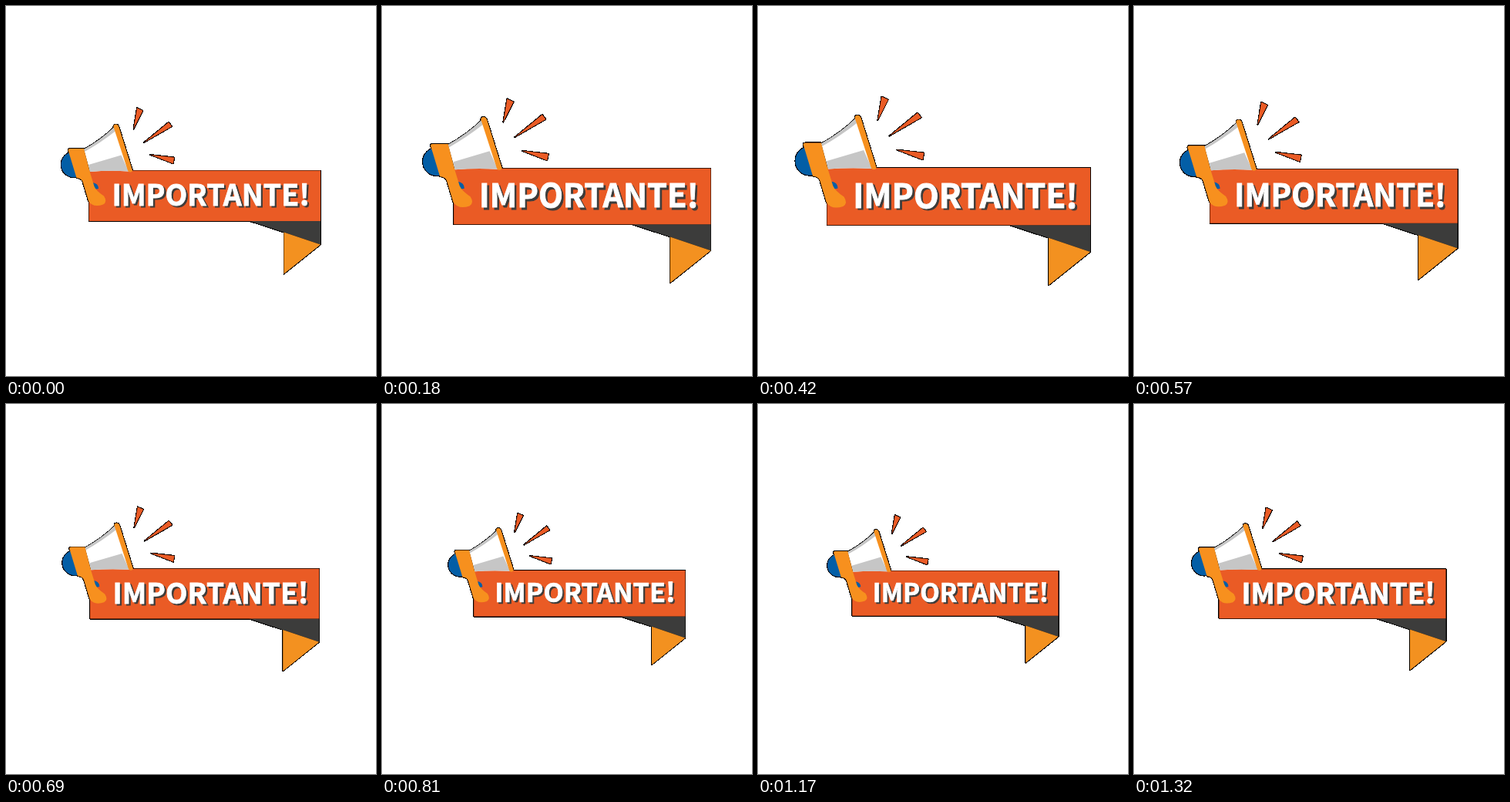
Write an HTML page that moves like this. It is 480 px wide and 480 px high and loops after 1.35 s.

```html
<!DOCTYPE html>
<html lang="es">
<head>
<meta charset="utf-8">
<style>
  html, body { margin: 0; width: 100%; height: 100%; overflow: hidden; background: #fff; }
  svg { display: block; width: 100%; height: 100%; }
  path, circle { vector-effect: non-scaling-stroke; stroke-linejoin: round; }
  text { font: 700 37.4px "Noto Sans CJK JP", "Noto Sans CJK SC", "Noto Sans CJK", "Open Sans", sans-serif; text-anchor: middle; stroke-width: .8px; }
</style>
</head>
<body>
<svg viewBox="0 0 480 480">
  <defs>
    <g id="art">
      <!-- banner and folded tail -->
      <path fill="#3c3c3b" d="M316 279H408V309.5L360.5 293.5Z"/>
      <path fill="#f39120" d="M360.5 293.5L408 309.5L360.5 347.5Z"/>
      <path fill="#ea5b25" d="M107.7 213.6H408V279H107.7Z"/>
      <!-- megaphone -->
      <circle fill="#035ea6" cx="88" cy="205.7" r="16.5"/>
      <path fill="#035ea6" d="M112 229Q120 230 120 237L115 238Z"/>
      <path fill="#fff" d="M101 186Q123 174 141 156.5L159 214.5Q134 213 109 215Z"/>
      <path fill="#c6c6c6" d="M101 186Q123 174 141 156.5L143 161.5Q122 178 102 189Z"/>
      <path fill="#c6c6c6" d="M107 206L149.5 193.4L159 214.5Q134 213 109 215Z"/>
      <path fill="#f7901e" d="M80.500 187Q80.500 185 83 185H101L109 216L114.500 234Q117 240 127 246.500Q132 254 126 257.500Q113 262 107 253L99.500 228Q98 223.500 91.500 223L83 195Z"/>
      <path fill="#f7901e" d="M139.500 157Q139 153.500 142.500 153.500Q145.500 153.500 146.500 157L164 213Q164 215.500 161 215.500Q158.500 215.500 157.500 212Z"/>
      <!-- sound bursts -->
      <g fill="#ea5b25">
        <path d="M165.500 159.500L170 132.300L177.500 135.700Z"/>
        <path d="M178.800 177.200L211 150.700L215.200 156.200Z"/>
        <path d="M187.300 193L218.300 196.500L216.800 204.400Z"/>
      </g>
    </g>
  </defs>
  <g id="badge">
    <use href="#art" stroke="#000" stroke-width="2" shape-rendering="crispEdges"/>
    <use href="#art"/>
    <text x="268" y="261.200" fill="#3c3c3b" stroke="#3c3c3b">IMPORTANTE!</text>
    <text x="265.700" y="259" fill="#fff" stroke="#fff">IMPORTANTE!</text>
  </g>
</svg>
<script>
  const LOOP = 1350, STEP = 30;
  const badge = document.getElementById("badge");

  function draw(now) {
    const time = Math.floor((now % LOOP) / STEP) * STEP;
    const scale = 1 + 0.148 * Math.sin(2 * Math.PI * time / LOOP);
    badge.setAttribute("transform", `translate(240 240) scale(${scale}) translate(-240 -240)`);
    requestAnimationFrame(draw);
  }
  draw(0);
</script>
</body>
</html>
```
